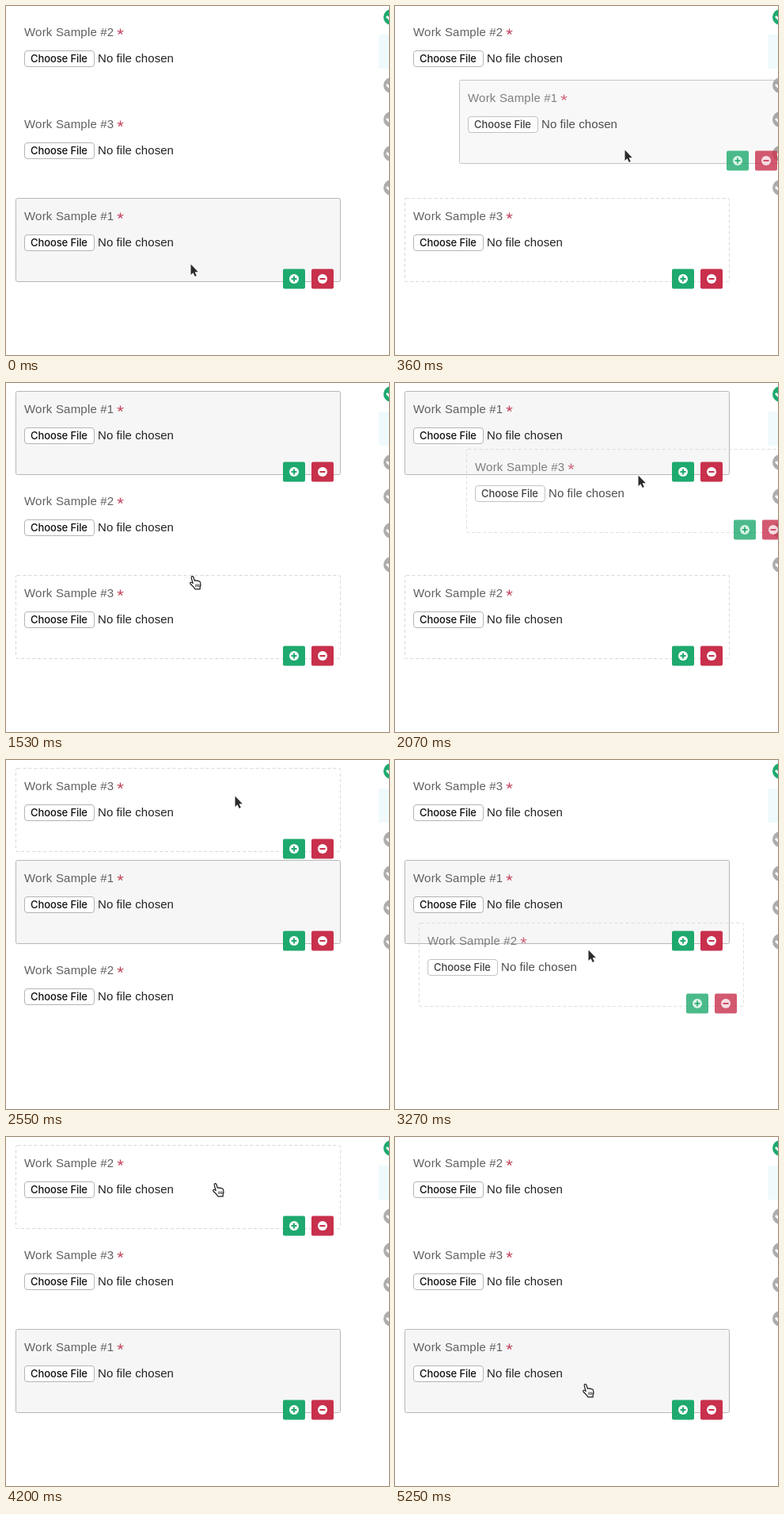
An HTML page with a canvas for the animation above (5820 ms loop, 484 px wide and 440 px high).

```html
<!DOCTYPE html>
<html lang="en">
<head>
<meta charset="utf-8">
<title>Reordering upload cards</title>
<style>
  html, body { margin: 0; width: 100%; height: 100%; overflow: hidden; background: #fff; }
  canvas { display: block; }
</style>
</head>
<body>
<canvas id="stage" width="484" height="440"></canvas>
<script>
const ctx = document.getElementById('stage').getContext('2d');
const LOOP = 5820, STEP = 30, PITCH = 116, SELECTED = 1;
const GREEN = '#1ea96e', RED = '#c8304c';
const SANS = '"Liberation Sans", Arial, sans-serif';

// Each drag lifts the bottom card, reaches the top slot and drops it there
const drags = [
  { from: 30, reach: 990, drop: 1110, start: [233, 325], end: [277, 65], grip: [209, 88] },
  { from: 1830, reach: 540, drop: 2550, start: [229, 275], end: [289, 45], grip: [217, 33] },
  { from: 3210, reach: 690, drop: 4050, start: [226, 276], end: [265, 54], grip: [214, 34] }
];
const REST = [241, 312], PAUSE = 60, RETURN = 540, BULGE = 37;

const arrowShape = new Path2D('M.5 .5V14L3.5 11.2L5.8 16L7.8 15.1L5.6 10.3H9.8Z');
const handShape = new Path2D('M4.2 9.6L2.3 3Q1.8 1 3.2.6Q4.5.4 5 2L6.2 6.2Q7.6 5.2 8.7 6.5' +
  'Q10.2 5.6 11.2 7Q13 6.6 13.6 8.6Q14.6 11.6 13.2 14V16.8H6.8Q5.6 14.4 3.6 12.7L1 10.2Q.3 8.8 1.5 8.3Q2.7 8 4.2 9.6Z');
const knuckles = new Path2D('M7.9 10.5V14M9.9 10.5V14M11.8 10.5V14');

const clamp = u => Math.min(1, Math.max(0, u));
const easeOut = u => 1 - (1 - u) ** 2;
const easeInOut = u => u < .5 ? 4 * u ** 3 : 1 - 4 * (1 - u) ** 3;
const mix = (a, b, e) => a.map((v, i) => v + (b[i] - v) * e);

// Out along a curve bulging to the right, then straight back down
function pointer(t) {
  const i = Math.max(0, drags.findLastIndex(d => t >= d.from)), d = drags[i];
  let pos;
  if (t < d.drop) {
    const u = clamp((t - d.from) / d.reach);
    pos = mix(d.start, d.end, easeOut(u));
    pos[0] += BULGE * 4 * u * (1 - u);
  } else {
    const next = i < 2 ? drags[i + 1].start : REST;
    pos = mix(d.end, next, easeInOut(clamp((t - d.drop - PAUSE) / RETURN)));
  }
  return pos.map(Math.round);
}

function box(x, y, w, h, r, fill, stroke) {
  ctx.beginPath();
  ctx.roundRect(x, y, w, h, r);
  if (fill) { ctx.fillStyle = fill; ctx.fill(); }
  if (stroke) { ctx.strokeStyle = stroke; ctx.lineWidth = 1; ctx.stroke(); }
}

function disc(x, y, r, fill) {
  ctx.beginPath();
  ctx.arc(x, y, r, 0, 7);
  ctx.fillStyle = fill;
  ctx.fill();
}

function text(str, x, y, font, fill, spacing) {
  ctx.font = font;
  ctx.letterSpacing = spacing + 'px';
  ctx.fillStyle = fill;
  ctx.fillText(str, x, y);
}

function button(x, y, color, plus) {
  box(x, y - .5, 28, 25, 2, color);
  disc(x + 14, y + 12, 6, '#fff');
  ctx.fillStyle = color;
  ctx.fillRect(x + 10.5, y + 11, 7, 2);
  if (plus) ctx.fillRect(x + 13, y + 8.5, 2, 7);
}

function star(x, y) {
  ctx.beginPath();
  for (let i = 0; i < 5; i++) {
    const a = (i * 0.4 - 0.5) * Math.PI;
    ctx.moveTo(x, y);
    ctx.lineTo(x + 4 * Math.cos(a), y + 4 * Math.sin(a));
  }
  ctx.strokeStyle = '#c4475f';
  ctx.lineWidth = 1.3;
  ctx.stroke();
}

function card(n, x, y, active) {
  const selected = n === SELECTED;
  if (selected) box(x + .5, y + .5, 410, 105, 2, 'rgba(0,0,0,.035)', '#b8b8b8');
  else if (active) {
    ctx.setLineDash([4, 3]);
    box(x + .5, y + .5, 410, 105, 2, null, '#d8d8d8');
    ctx.setLineDash([]);
  }
  text('Work Sample #' + n, x + 11, y + 28, '15px ' + SANS, '#606060', .2);
  star(x + 132.5, y + 22.5);
  box(x + 11.5, y + 46.5, 88, 20, 3.5, '#fff', '#b4b4b4');
  text('Choose File', x + 19, y + 61, '500 13px Inter, sans-serif', '#111', -.1);
  text('No file chosen', x + 104, y + 61, '15px ' + SANS, '#222', .07);
  if (selected || active) {
    button(x + 338, y + 90, GREEN, true);
    button(x + 374, y + 90, RED, false);
  }
}

function sidebar() {
  ctx.fillStyle = '#f0fafd';
  ctx.fillRect(471, 36, 13, 43);
  for (let i = 0; i < 5; i++) {
    const y = 14 + 43 * (i && i + 1);
    disc(487, y, 10, i ? '#adadad' : GREEN);
    ctx.beginPath();
    ctx.moveTo(481, y - 1);
    ctx.lineTo(485.5, y + 3.5);
    ctx.lineTo(492, y - 3);
    ctx.strokeStyle = '#fff';
    ctx.lineWidth = 2.8;
    ctx.stroke();
  }
}

function cursor(x, y, arrow) {
  ctx.save();
  ctx.lineJoin = 'round';
  if (arrow) {
    ctx.translate(x, y);
    ctx.strokeStyle = '#fff';
    ctx.lineWidth = 2.4;
    ctx.stroke(arrowShape);
    ctx.fillStyle = '#2b2b2b';
    ctx.fill(arrowShape);
  } else {
    ctx.translate(x - 4, y - 1);
    ctx.fillStyle = '#fff';
    ctx.fill(handShape);
    ctx.strokeStyle = '#1a1a1a';
    ctx.lineWidth = 1.2;
    ctx.stroke(handShape);
    ctx.lineWidth = .9;
    ctx.stroke(knuckles);
  }
  ctx.restore();
}

function draw(t) {
  const [x, y] = pointer(t);
  const held = drags.find(d => t >= d.from && t < d.drop);
  const dropped = drags.filter(d => t >= d.drop).length;
  // Every drop rotates the list by one
  const order = [4, 5, 6].map(n => (n - dropped) % 3 + 1);
  let hover = Math.floor((y - 10) / PITCH), lifted;
  if (held) {
    lifted = order.pop();
    order.splice(Math.floor((y + 31) / PITCH), 0, null);
    hover = 2;
  }
  ctx.fillStyle = '#fff';
  ctx.fillRect(0, 0, 484, 440);
  sidebar();
  order.forEach((n, i) => n && card(n, 12, 10 + PITCH * i, i === hover));
  if (held) {
    ctx.globalAlpha = .8;
    card(lifted, x - held.grip[0], y - held.grip[1], true);
    ctx.globalAlpha = 1;
  }
  cursor(x, y, drags.some(d => t >= d.from - STEP && t < d.drop + PAUSE));
}

const begin = performance.now();
function tick() {
  const t = (performance.now() - begin) % LOOP;
  draw(Math.floor(t / STEP) * STEP);
  requestAnimationFrame(tick);
}
tick();
</script>
</body>
</html>
```
